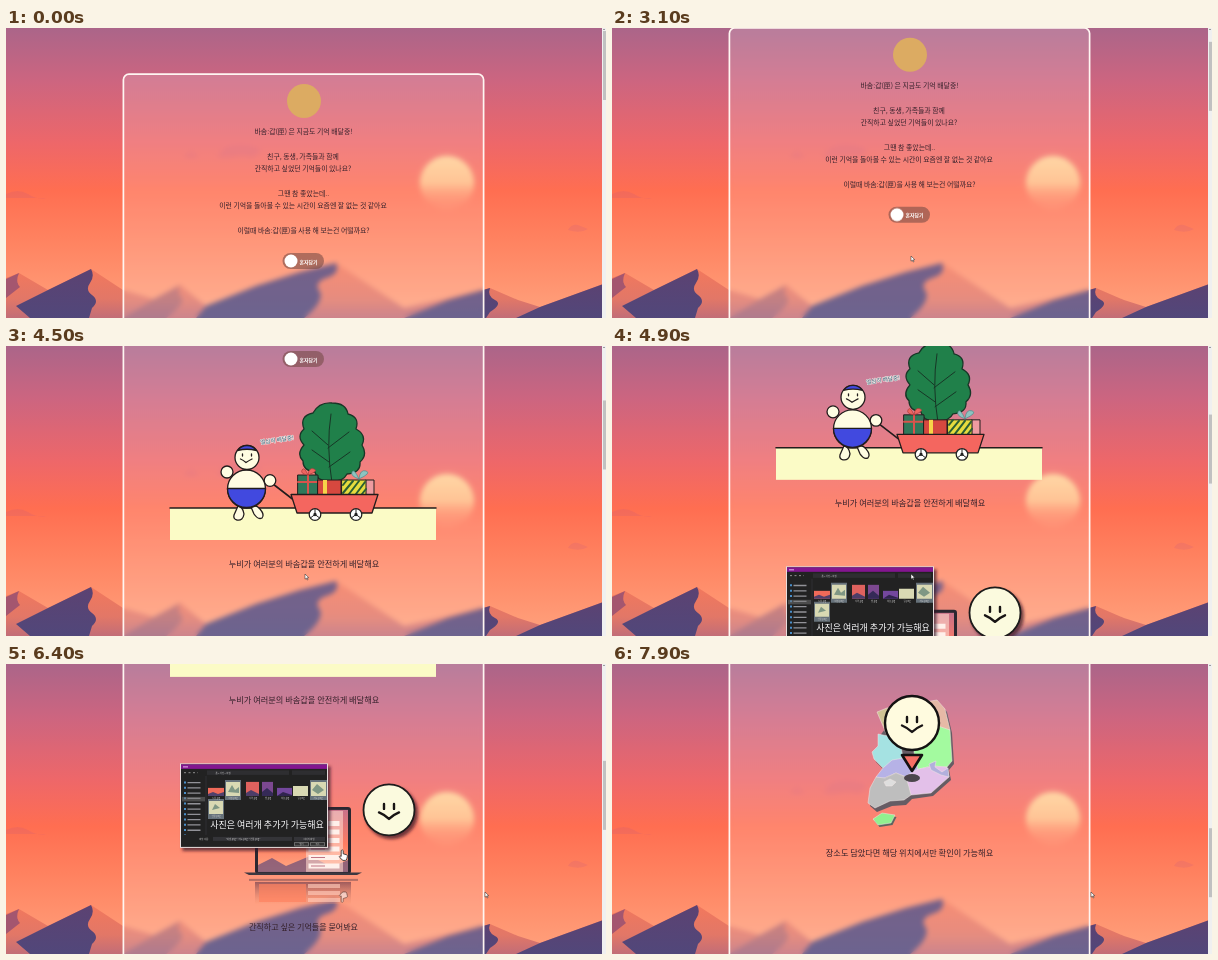
Animation of 600x290 px, one loop 8 s. Source, as an HTML page:

```html
<!DOCTYPE html>
<html>
<head>
<meta charset="utf-8">
<title>Memory box page</title>
<style>
@property --s { syntax: '<number>'; inherits: true; initial-value: 0; }
html, body { margin: 0; width: 100%; height: 100%; overflow: hidden; }
.stage { position: relative; width: 600px; height: 290px; overflow: hidden; animation: scroll 8s infinite ease-in-out; }
svg { position: absolute; left: 0; top: 0; display: block; overflow: visible; }
text { font-family: "Noto Sans CJK KR", "Noto Sans CJK JP", "Noto Sans CJK", sans-serif; text-anchor: middle; dominant-baseline: central; }

/* --s is the scroll offset in px */
@keyframes scroll {
  0%, 35% { --s: 0; }
  45%, 48.75% { --s: 157; }
  53.75%, 57.5% { --s: 220; }
  66.25%, 78.75% { --s: 378; animation-timing-function: linear; }
  88.75% { --s: 561; animation-timing-function: linear; }
  97.5%, 100% { --s: 689; }
}
.page { position: absolute; left: 0; top: 0; width: 600px; height: 1220px; transform: translateY(calc(var(--s) * -1px)); }
.panel {
  position: absolute; left: 117px; top: 46px; width: 361px; height: 1120px; border-radius: 6px;
  background: rgba(255, 255, 255, .16); backdrop-filter: blur(2.5px);
}
.copy { font-size: 6.9px; fill: #35202a; }
.caption { font-size: 8.2px; fill: #35202a; }

/* scenes fade in once the page has scrolled past --at */
.scene { opacity: clamp(0, (var(--s) - var(--at)) / 40, 1); }

.track { position: absolute; right: 0; top: 0; width: 4px; height: 290px; background: #f0f0f0; }
.thumb {
  position: absolute; left: .5px; width: 3px; height: 69px; background: #c1c1c1;
  transform: translateY(calc(3px + var(--s) * .234px)); animation: thumb 8s infinite step-end;
}
@keyframes thumb { 0%, 28% { height: 69px; } 17% { height: 49px; } }

.pill { animation: pill 8s infinite; }
@keyframes pill { 0%, 16%, 30%, 100% { fill: rgba(115, 72, 66, .56); } 19%, 27% { fill: #ff9b2d; } }
.knob { animation: knob 8s infinite; }
@keyframes knob { 0%, 16%, 30%, 100% { transform: none; } 19%, 27% { transform: translateX(24.5px); } }
.solo { animation: solo 8s infinite step-end; }
@keyframes solo { 0%, 28% { opacity: 1; } 17% { opacity: 0; } }
.duo { animation: duo 8s infinite step-end; }
@keyframes duo { 0%, 28% { opacity: 0; } 17% { opacity: 1; } }

.cursor { animation: cursor 8s infinite ease-in-out; }
@keyframes cursor {
  0%, 8% { transform: translate(300px, 296px); }
  13%, 69% { transform: translate(299px, 228px); }
  76%, 100% { transform: translate(479px, 228px); }
}
.arrow { animation: arrow 8s infinite step-end; }
@keyframes arrow { 0%, 35% { opacity: 1; } 12.5% { opacity: 0; } }
.hand { animation: hand 8s infinite step-end; }
@keyframes hand { 0%, 35% { opacity: 0; } 12.5% { opacity: 1; } }
</style>
</head>
<body>
<div class="stage">

<svg width="600" height="290" viewBox="0 0 600 290">
  <defs>
    <linearGradient id="sky" x2="0" y2="1">
      <stop offset="0" stop-color="#ab6589"/>
      <stop offset=".18" stop-color="#cc6580"/>
      <stop offset=".4" stop-color="#ee6769"/>
      <stop offset=".56" stop-color="#ff6e51"/>
      <stop offset=".72" stop-color="#ff815f"/>
      <stop offset="1" stop-color="#ffa27d"/>
    </linearGradient>
    <linearGradient id="sun" x2="0" y2="1">
      <stop offset="0" stop-color="#ffcf94"/>
      <stop offset=".5" stop-color="#ffb982"/>
      <stop offset=".9" stop-color="#ff8f66" stop-opacity="0"/>
    </linearGradient>
    <radialGradient id="halo">
      <stop offset=".7" stop-color="#ffb080" stop-opacity=".2"/>
      <stop offset="1" stop-color="#ffb080" stop-opacity="0"/>
    </radialGradient>
    <linearGradient id="lit" gradientUnits="userSpaceOnUse" x1="0" y1="240" x2="0" y2="296">
      <stop offset="0" stop-color="#f3785c"/>
      <stop offset=".55" stop-color="#e27767"/>
      <stop offset="1" stop-color="#b86a7c"/>
    </linearGradient>
    <linearGradient id="shade" x2="0" y2="1">
      <stop offset="0" stop-color="#5c4272"/>
      <stop offset="1" stop-color="#51477a"/>
    </linearGradient>
    <filter id="soft" x="-30%" y="-30%" width="170%" height="170%">
      <feDropShadow dx="2.5" dy="3" stdDeviation="1.5" flood-color="#301820" flood-opacity=".7"/>
    </filter>
    <path id="handShape" d="M2.2 7V1.2q1-1.6 2 0V4.4l3.4 1q1 .4.8 1.6L7.8 9.5q-.2 1.5-1.5 1.5H4Q2.5 10.5.3 7.2q.4-1.3 1.9-.2z" fill="#fff" stroke="#222" stroke-width=".8" stroke-linejoin="round"/>
    <g id="wheel" fill="#fff" stroke="#222" stroke-width="1.3">
      <circle r="5.8"/>
      <path d="M0 0V-5M0 0L4 3M0 0L-4 3" stroke-width="1"/>
      <circle r="1" fill="#222"/>
    </g>
    <g id="face" fill="none" stroke="#181414" stroke-width="2.4" stroke-linecap="round" stroke-linejoin="round">
      <path d="M-5-7v5M5-7v5M-10 1.5Q-4 4 0 8Q4 4 10 1.5"/>
    </g>
  </defs>

  <rect width="600" height="290" fill="url(#sky)"/>
  <g fill="#c85a7c" opacity=".2">
    <path d="M178 130q3-7 9-6l6 6zM212 130q2-12 17-13t26 4q-3 8-10 9-6-3-15-1t-18 1z"/>
    <path d="M562 202q3-6 10-5l10 4q-8 5-20 1zM0 166q12-6 22 0t18 4H0z"/>
  </g>
  <circle cx="441" cy="153" r="32" fill="url(#halo)"/>
  <circle cx="441" cy="155" r="27" fill="url(#sun)"/>

  <path fill="url(#lit)" d="M0 250L13 245L42 262L85 241L117 262L148 271L174 257L200 278L250 258L294 244L330 235L398 280L442 270L484 260L512 272L534 279L600 255V290H0z"/>
  <path d="M0 251L13 245Q9 254 14 259L0 270z" fill="#a4566f"/>
  <g fill="url(#shade)">
    <path d="M10 278L42 262L85 241Q89 248 84 255T86 267Q94 273 86 280L83 290H24z"/>
    <path d="M148 271L174 257Q170 264 176 270Q178 277 160 290H117z" opacity=".3"/>
    <path d="M190 290L200 278L250 258L294 244L330 235Q334 245 323 249Q306 254 314 264Q318 274 298 290z"/>
    <path d="M398 290L442 272L484 260Q481 268 489 272T484 284L480 290z"/>
    <path d="M510 290L534 279L600 255V290z"/>
  </g>
</svg>

<div class="page">
  <div class="panel"></div>
  <svg width="600" height="1220" viewBox="0 0 600 1220">
    <rect x="117.4" y="46.2" width="360.2" height="1119" rx="5.5" fill="none" stroke="#fff6f2" stroke-width="1.7"/>
    <circle cx="298" cy="73" r="17" fill="#dcab62"/>
    <g class="copy">
      <text x="297.5" y="103">바솜:갑(匣) 은 지금도 기억 배달중!</text>
      <text x="297" y="128">친구, 동생, 가족들과 함께</text>
      <text x="297" y="140">간직하고 싶었던 기억들이 있나요?</text>
      <text x="297.5" y="165">그땐 참 좋았는데..</text>
      <text x="297" y="177">이런 기억을 돌아볼 수 있는 시간이 요즘엔 잘 없는 것 같아요</text>
      <text x="297.5" y="202">이럴때 바솜:갑(匣)을 사용 해 보는건 어떨까요?</text>
    </g>

    <g font-size="4.9" font-weight="700" fill="#fff">
      <rect class="pill" x="276.5" y="225" width="41.5" height="16" rx="8"/>
      <circle class="knob" cx="285" cy="233" r="6.5"/>
      <text class="solo" x="302.5" y="233">혼자담기</text>
      <text class="duo" x="291.5" y="233">함께담기</text>
    </g>

    <!-- delivery -->
    <g class="scene" style="--at: 50">
    <g transform="translate(0 220)" stroke="#221c1c" stroke-width="1.3" stroke-linejoin="round" stroke-linecap="round">
      <rect x="164" y="162" width="266" height="32" fill="#fbfbc6" stroke="none"/>
      <path d="M164 162H430" stroke-width="1.5"/>

      <path fill="#20804a" stroke="#173626" d="M324 135Q311 136 309 126Q297 125 297 115Q290 108 298 99Q290 90 298 83Q293 70 307 67Q313 56 326 57Q340 57 342 68Q354 71 350 83Q361 89 356 99Q362 109 354 116Q355 127 341 128Q337 136 324 135z"/>
      <path d="M326 137Q320 100 325 68M323 116L306 104M323 121L344 106M322 99L306 85M322 102L343 86" fill="none" stroke="#173626" stroke-width="1"/>

      <g stroke-width="1">
        <rect x="292" y="129" width="20" height="20" fill="#30785a"/>
        <path d="M302 129v20M292 136h20" stroke="#d9534c" stroke-width="2"/>
        <rect x="312" y="134" width="23" height="15" fill="#d6483f"/>
        <path d="M319 134v15" stroke="#f7d449" stroke-width="4" stroke-linecap="butt"/>
        <rect x="360" y="134" width="8" height="15" fill="#ee9ba0"/>
        <rect x="336" y="134" width="24" height="15" fill="#e6dc3e"/>
        <path d="M337 139l4-5M337 147l10-12M343 148l10-13M350 148l9-12M356 148l4-5" stroke="#2b5f33" stroke-width="2"/>
        <path d="M302 129q-8-1-6-5t6 5q1-8 6-6t-6 6z" fill="#ee6661" stroke="#a93c3c" stroke-width=".7"/>
        <path d="M353 133q-9-3-7-7t7 7q1-10 7-8t-7 8z" fill="#8cc4c0" stroke="#55878a" stroke-width=".7"/>
      </g>
      <path d="M267 138L289 155" stroke-width="1.6"/>
      <path d="M285 148.5H372L366 167H291z" fill="#f4665f"/>
      <use href="#wheel" x="309" y="168.5"/>
      <use href="#wheel" x="350" y="168.5"/>

      <g fill="#fffce2">
        <path d="M232 160Q237 161 238 168Q237 175 231 174Q227 173 228 169zM245 161Q250 158 254 163Q259 169 256 172Q252 174 248 168z"/>
        <circle cx="240.5" cy="143" r="19"/>
        <path d="M221.5 142.5H259.5A19 19 0 0 1 221.5 142.5z" fill="#4149df"/>
        <circle cx="221" cy="126" r="6"/>
        <circle cx="264" cy="134.5" r="5.8"/>
        <circle cx="241" cy="111.5" r="12"/>
        <path d="M231.5 104.5Q235 99.5 241 99.5T250.5 104.5Q241 102 231.5 104.5z" fill="#4149df"/>
        <path d="M236.5 108v2M245.5 108v2M234.5 113Q237 114 240 116.5Q243 114.5 246 113" fill="none"/>
      </g>
      <text transform="translate(271 94) rotate(-8)" font-size="5.6" fill="#2d5870" stroke="#f5e9e6" stroke-width="1.2" paint-order="stroke">열심히 배달중!</text>
    </g>
    </g>
    <text class="caption" x="298" y="436.5">누비가 여러분의 바솜갑을 안전하게 배달해요</text>

    <!-- laptop -->
    <g class="scene" style="--at: 225">
    <g transform="translate(0 378)">
      <linearGradient id="screen" x2="0" y2="1">
        <stop offset="0" stop-color="#c8718a"/>
        <stop offset=".55" stop-color="#ff7d62"/>
        <stop offset="1" stop-color="#ffa983"/>
      </linearGradient>
      <linearGradient id="mirror" x2="0" y2="1">
        <stop offset="0" stop-color="#7d4652" stop-opacity=".75"/>
        <stop offset="1" stop-color="#ff9b75" stop-opacity=".25"/>
      </linearGradient>
      <rect x="249" y="166" width="96" height="67" rx="3" fill="#2b2730"/>
      <rect x="252" y="169" width="90" height="62" fill="url(#screen)"/>
      <path d="M252 224l14-7 14 8 24-10 22 11 16-7v12h-90z" fill="#705078" opacity=".75"/>
      <rect x="300" y="170" width="37" height="61" fill="#ffd8cb" opacity=".6"/>
      <path d="M318 180V230" stroke="#fff0ea" stroke-width="31" stroke-dasharray="5 3.5"/>
      <path d="M312 182V230" stroke="#c07484" stroke-width="14" stroke-dasharray="1 7.5"/>
      <path d="M238 231.5H356L351 234H243z" fill="#3c3740"/>
      <rect x="243" y="238" width="109" height="2" fill="#6b4650" opacity=".5"/>
      <rect x="249" y="241" width="96" height="22" fill="url(#mirror)"/>
      <path d="M253 243h47v18h-47z" fill="#ff8260" opacity=".7"/>
      <path d="M318 243v19" stroke="#ffc9b8" stroke-width="32" stroke-dasharray="4 3" opacity=".65"/>
      <use href="#handShape" transform="translate(333 251) scale(1 -1) translate(0 -11)" opacity=".55"/>
      <use href="#handShape" x="333" y="208.5"/>

      <g filter="url(#soft)">
        <rect x="174.5" y="123" width="147" height="83.5" fill="#202022" stroke="#e9dede" stroke-width="1"/>
        <rect x="175" y="123.5" width="146" height="4.5" fill="#83168f"/>
      </g>
      <path d="M177 126h5" stroke="#e8b5ee"/>
      <rect x="201" y="129.5" width="82" height="4.5" fill="#2e2e31"/>
      <rect x="286" y="129.5" width="33" height="4.5" fill="#2e2e31"/>
      <path d="M178 131.8h14" stroke="#aaa" stroke-width=".8" stroke-dasharray="2 2.5"/>
      <path d="M188 141V194" stroke="#929298" stroke-width="13" stroke-dasharray="1.3 4"/>
      <path d="M179 140.5V194" stroke="#4a8fca" stroke-width="2" stroke-dasharray="2 3.3"/>
      <rect x="176" y="156" width="23" height="4.5" fill="#777" opacity=".5"/>
      <path d="M200 135V194" stroke="#3c3c40" stroke-width=".6"/>

      <path d="M219 139h16v20h-16zM304 139h17v20h-17zM202 158h16v20h-16z" fill="#66717a"/>
      <rect x="202" y="147" width="16" height="8" fill="#ef6a59"/>
      <path d="M202 155v-2l5-2 5 2 6-2v4z" fill="#50406b"/>
      <path d="M220 141h14v14h-14zM287 145h15v10h-15zM305 141h15v14h-15zM203 160h14v13h-14z" fill="#d9d9b3"/>
      <path d="M222 151l4-7 3 5 4-3v6zM306 149l5-6 7 6-6 4zM206 169l3-6 5 4z" fill="#7f9784"/>
      <rect x="240" y="141" width="13" height="14" fill="#df625e"/>
      <path d="M240 155v-3l5-3 8 4v2z" fill="#4d3d68"/>
      <rect x="256" y="141" width="11" height="14" fill="#7c4890"/>
      <path d="M256 151l5-4 6 5v3h-11z" fill="#352a57"/>
      <rect x="271" y="147" width="15" height="8" fill="#73479d"/>
      <path d="M271 155l6-4 9 3v1z" fill="#30244e"/>
      <g font-size="2.3" fill="#ccc">
        <text x="217" y="131.8">홈 &gt; 사진 &gt; 여행</text>
        <text x="210" y="157">노을.jpg</text>
        <text x="227" y="157">여행.png</text>
        <text x="247" y="157">사막.jpg</text>
        <text x="262" y="157">밤.jpg</text>
        <text x="279" y="157">하늘.jpg</text>
        <text x="295" y="157">길.png</text>
        <text x="312" y="157">지도.png</text>
        <text x="210" y="175.5">선물.png</text>
        <rect x="207" y="196" width="79" height="4" fill="#343438"/>
        <text x="198" y="198">파일 이름:</text>
        <text x="237" y="198">"여행.png" "지도.png" "선물.png"</text>
        <rect x="288" y="196" width="31" height="4" fill="#343438"/>
        <text x="303" y="198">이미지 파일</text>
        <path d="M288.5 201.5h14v3.5h-14zM304.5 201.5h14v3.5h-14z" fill="#333" stroke="#aaa" stroke-width=".5"/>
        <text x="295.5" y="203.2">열기</text>
        <text x="311.5" y="203.2">취소</text>
      </g>
      <text x="261" y="184" font-size="9" fill="#fff" stroke="#202022" stroke-width="1.5" paint-order="stroke">사진은 여러개 추가가 가능해요</text>

      <circle cx="383" cy="169" r="25.5" fill="#fbfade" stroke="#1c1a1a" stroke-width="1.8" filter="url(#soft)"/>
      <use href="#face" x="383" y="170"/>
    </g>
    </g>
    <text class="caption" x="297.5" y="664" style="font-size: 8.05px">간직하고 싶은 기억들을 묻어봐요</text>

    <!-- map -->
    <g class="scene" style="--at: 470">
    <g transform="translate(0 689)">
      <path transform="translate(2 3)" fill="#665c64" d="M265 48L275 44L300 40L325 36L333 45L338 66L340 97L335 103L337 113L319 129L298 132L292 138L278 139L263 145L256 139L258 124L264 113L271 104L262 95L260 88L266 82L265 70L271 62z"/>
      <path transform="translate(1.5 2)" fill="#5c6660" d="M261 155L270 149L283 151L279 159L266 161z"/>
      <g stroke="#f3e6e4" stroke-width=".5" stroke-linejoin="round">
        <path fill="#cfc294" d="M265 48L275 44L300 40L306 70L288 82L275 72L271 62z"/>
        <path fill="#e6b9a6" d="M300 40L325 36L333 45L338 66L318 72L306 66z"/>
        <path fill="#a3fa9f" d="M306 68L326 62L338 66L340 97L335 103L319 102L305 106L302 88z"/>
        <path fill="#a5e2e2" d="M266 70L276 72L289 82L291 94L282 97L271 104L262 95L260 88L266 82z"/>
        <path fill="#b6b2e6" d="M271 104L280 96L292 94L304 97L306 106L294 113L284 109L270 115L264 113z"/>
        <path fill="#e3c0e9" d="M294 112L306 105L321 102L335 103L337 113L319 129L299 131L295 121z"/>
        <path fill="#b2b0dc" d="M317 100L324 97L323 103L330 108L336 104L337 113L329 111L319 106z"/>
        <path fill="#bebebe" d="M264 113L273 114L284 109L294 113L297 123L299 131L292 136L278 137L263 144L256 139L258 124z"/>
        <path fill="#dedede" d="M272 118L278 115L284 118L280 122L274 122z"/>
        <path fill="#91f08f" d="M261 155L270 149L283 151L279 159L266 161z"/>
      </g>
      <ellipse cx="300" cy="114" rx="8" ry="4" fill="#4b454c"/>
      <path d="M290 91H310L300 107z" fill="#f66f65" stroke="#141212" stroke-width="2.6" stroke-linejoin="round"/>
      <circle cx="300" cy="59" r="27" fill="#fffbdf" stroke="#141212" stroke-width="2.4"/>
      <use href="#face" x="300" y="60"/>
    </g>
    </g>
    <text class="caption" x="297.5" y="877">장소도 담았다면 해당 위치에서만 확인이 가능해요</text>
  </svg>
</div>

<div class="track"><div class="thumb"></div></div>
<svg width="600" height="290" viewBox="0 0 600 290">
  <path d="M597 2L598 .8L599 2z" fill="#666"/>
  <g class="cursor">
    <path class="arrow" d="M0 0V5.2L1.3 4.1L2.2 6L3 5.6L2.2 3.8L3.8 3.7z" fill="#fff" stroke="#222" stroke-width=".5"/>
    <use class="hand" href="#handShape" transform="scale(.62)"/>
  </g>
</svg>
</div>
</body>
</html>
```
